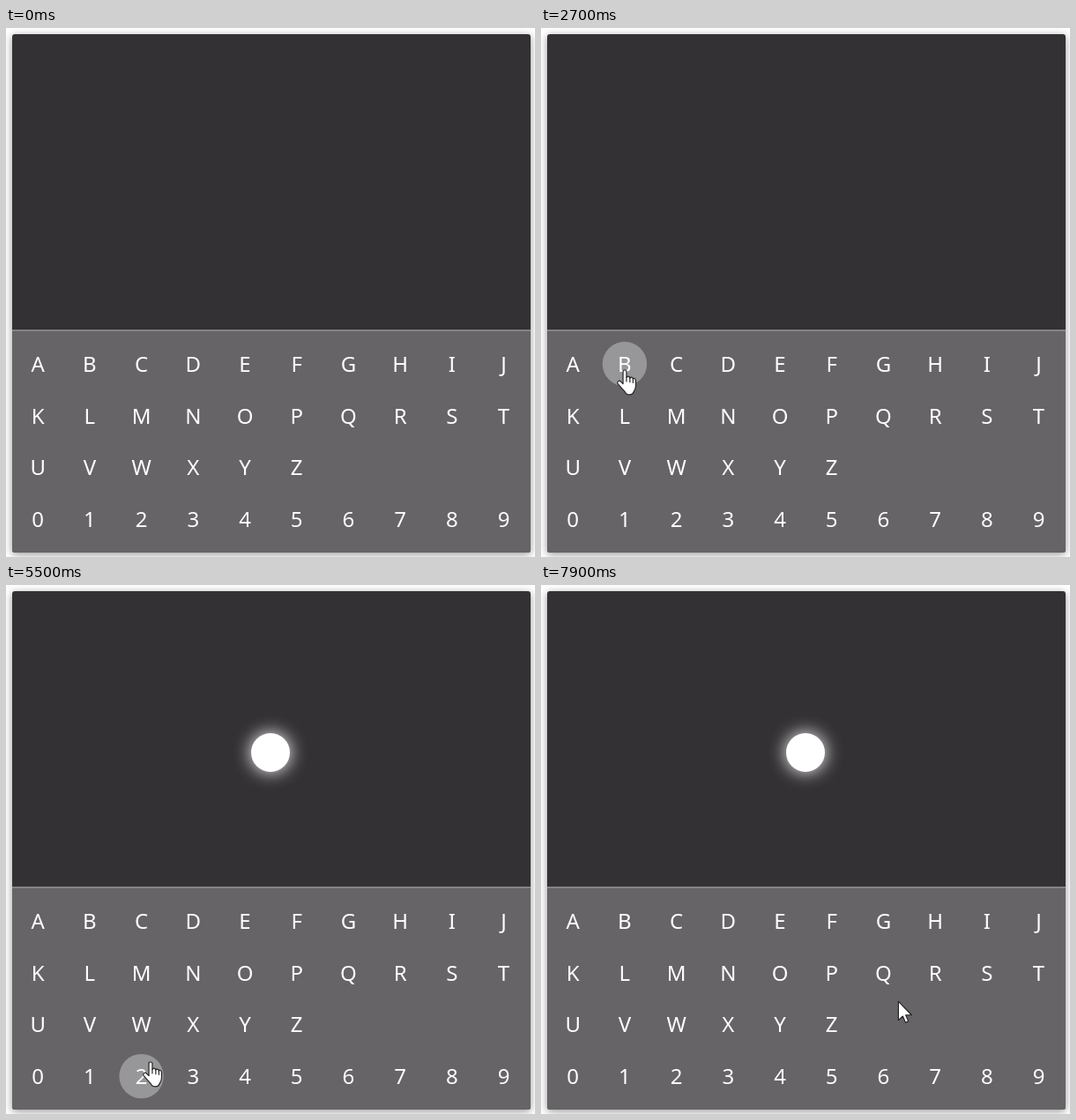
These frames come from a looping animation (600 px wide and 600 px high, 8000 ms). An HTML page:

```html
<!DOCTYPE html>
<html lang="en">
<head>
<meta charset="utf-8">
<title>Morse keyboard</title>
<style>
  html, body { margin: 0; width: 100%; height: 100%; overflow: hidden; background: #fff; }
  .panel {
    position: absolute; left: 7px; top: 7px; width: 587.5px; height: 587.5px;
    border-radius: 3px; overflow: hidden; background: #343134;
  }
  .shadow {
    position: absolute; left: 7px; top: 7px; width: 587.5px; height: 587.5px;
    border-radius: 3px; box-shadow: 0 2px 10px rgba(0, 0, 0, .42);
  }
  .keys {
    position: absolute; left: 0; right: 0; top: 335px; bottom: 0;
    box-sizing: border-box; background: #666466; border-top: 2.5px solid #858386;
  }
  .lamp {
    position: absolute; left: 278px; top: 168px; width: 44px; height: 44px;
    border-radius: 50%; background: #fff; box-shadow: 0 0 20px #fff; visibility: hidden;
  }
  svg { position: absolute; left: 0; top: 0; width: 600px; height: 600px; }
  text { font: 24px "Noto Sans", "Open Sans", sans-serif; fill: #fff; text-anchor: middle; }
  .cursor path { fill: #fff; stroke: #222; stroke-width: .9; stroke-linejoin: round; stroke-linecap: round; }
  .cursor .folds { fill: none; }
</style>
</head>
<body>
<div class="shadow"></div>
<div class="panel"><div class="keys"></div></div>
<div class="lamp" id="lamp"></div>
<svg viewBox="0 0 600 600">
  <circle id="halo" r="25.2" fill="#979698"/>
  <g id="labels"></g>
  <g id="cursor" class="cursor">
    <g id="arrow" transform="scale(1.3)">
      <path d="M.3.3V16.6L4.1 13.1L6.5 18.7L9 17.6L6.7 12.1H11.8Z"/>
    </g>
    <g id="hand" transform="scale(1.3) translate(-7 -.5)">
      <path d="M5.5 12.5V2Q5.5.5 7 .5T8.5 2V7Q9 6 10 6T11.5 7.5Q12 6.6 13 6.8T14.2 8.3Q14.6 7.6 15.4 7.8T16.6 9.5V14Q16.6 17 15 19Q14 22 11.3 22Q8.3 22 7.2 19.5L1 12.6Q.2 11 1.3 10.2T3.5 10.6Z"/>
      <path class="folds" d="M8.5 7V10.5M11.5 7.5V11M14.2 8.3V11.5"/>
    </g>
  </g>
</svg>
<script>
const LOOP = 8000, STEP = 100, PITCH = 58.7, RADIUS = 25.2;
const ROWS = ["ABCDEFGHIJ", "KLMNOPQRST", "UVWXYZ", "0123456789"];

// Pointer stops: time, x, y
const PATH = [
  [1300, 425, 520], [1700, 272, 432], [1900, 272, 431],
  [2500, 95, 389], [2700, 95, 388], [2800, 85, 390],
  [3100, 5, 455], [3400, 38, 545], [3600, 80, 547],
  [4200, 92, 542], [4800, 93, 543], [5100, 150, 545],
  [5500, 164, 541], [5700, 164, 541], [6200, 247, 494],
  [6400, 247, 494], [7200, 405, 472], [8000, 405, 472]
];
// Lamp flashes: on, off
const FLASHES = [[5300, 5600], [5900, 6200], [6500, 7300], [7600, 8000]];

const el = id => document.getElementById(id);
const show = (node, on) => { node.style.visibility = on ? "visible" : "hidden"; };

const keys = ROWS.flatMap((row, r) => [...row].map((label, c) =>
  ({ label, x: 36.2 + PITCH * c, y: 381 + PITCH * r })));

for (const key of keys) {
  const text = document.createElementNS("http://www.w3.org/2000/svg", "text");
  text.setAttribute("x", key.x);
  text.setAttribute("y", key.y + 8.8);
  text.textContent = key.label;
  el("labels").append(text);
}

function pointerAt(t) {
  const i = PATH.findIndex(stop => stop[0] > t);
  if (i < 1) return null;
  const [t0, x0, y0] = PATH[i - 1], [t1, x1, y1] = PATH[i];
  const u = (t - t0) / (t1 - t0), k = u * u * (3 - 2 * u);
  return { x: x0 + (x1 - x0) * k, y: y0 + (y1 - y0) * k };
}

function draw(t) {
  const p = pointerAt(t);
  const key = p && keys.find(k => Math.hypot(k.x - p.x, k.y - p.y) < 24.3);
  show(el("lamp"), FLASHES.some(([on, off]) => t >= on && t < off));
  show(el("halo"), key);
  show(el("arrow"), p && !key);
  show(el("hand"), key);
  if (key) {
    el("halo").setAttribute("cx", key.x);
    el("halo").setAttribute("cy", key.y);
  }
  if (p) el("cursor").setAttribute("transform", `translate(${p.x} ${p.y})`);
}

const start = performance.now();
function tick() {
  const t = (performance.now() - start) % LOOP;
  draw(Math.floor(t / STEP) * STEP);
  requestAnimationFrame(tick);
}
tick();
</script>
</body>
</html>
```
